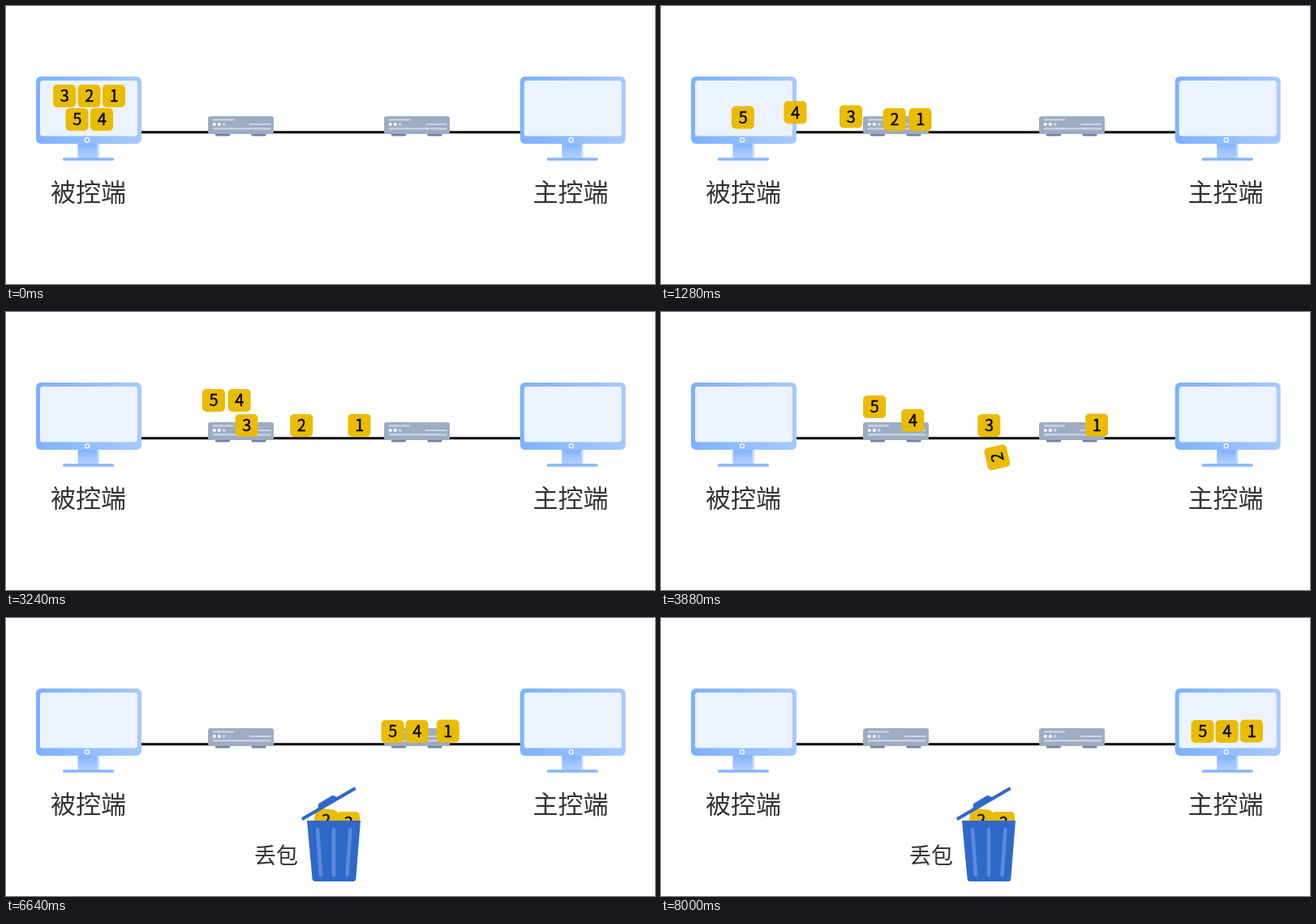
Write an HTML page that moves like this. It is 800 by 343 pixels and loops after 8.6 s.

```html
<!DOCTYPE html>
<html lang="zh-CN">
<head>
<meta charset="utf-8">
<title>丢包</title>
<style>
  html, body { margin: 0; width: 100%; height: 100%; overflow: hidden; background: #fff; }
  svg { display: block; width: 100%; height: 100%; }
  text { font-family: "Noto Sans CJK SC", "Noto Sans CJK JP", "Noto Sans CJK", sans-serif; }
  .label { fill: #333; }
  .digit { font-size: 20px; font-weight: 500; text-anchor: middle; stroke: #000; stroke-width: .4px; }
</style>
</head>
<body>
<svg viewBox="0 0 800 343" xmlns="http://www.w3.org/2000/svg">
  <defs>
    <linearGradient id="frame"><stop offset="0" stop-color="#7db1ff"/><stop offset="1" stop-color="#a6caff"/></linearGradient>
    <linearGradient id="neck" x2="0" y2="1"><stop offset="0" stop-color="#7fb2fe"/><stop offset="1" stop-color="#b4d2ff"/></linearGradient>
    <g id="monitor">
      <rect x="88.5" y="169" width="26" height="19" fill="url(#neck)"/>
      <rect x="112.5" y="169" width="2" height="19" fill="#c3dbff"/>
      <rect x="70" y="187.2" width="63" height="3.6" rx="1.5" fill="#86b6fd"/>
      <rect x="37" y="87" width="130" height="83" rx="6" fill="url(#frame)"/>
      <rect x="42" y="92" width="120" height="68.5" rx="3.5" fill="#ecf3ff"/>
      <circle cx="100" cy="165.2" r="2.6" fill="none" stroke="#fff" stroke-width="1.2"/>
    </g>
    <g id="router">
      <rect x="258" y="154" width="18" height="6.5" rx="1.5" fill="#71829e"/>
      <rect x="302.5" y="154" width="18" height="6.5" rx="1.5" fill="#71829e"/>
      <rect x="249" y="136" width="81" height="22" rx="3" fill="#9dacc3"/>
      <path d="M256 140.3h24M301 146h24.500M256 151.4h69.500" stroke="#cbd5e3" stroke-width="2.2" stroke-linecap="round"/>
      <circle cx="256.8" cy="146" r="2" fill="#fff"/>
      <circle cx="262.8" cy="146" r="2" fill="#fff"/>
      <circle cx="268.8" cy="146" r="1.9" fill="#cbd5e3"/>
    </g>
  </defs>

  <path d="M166 155.8H635" stroke="#000" stroke-width="3"/>
  <use href="#monitor"/>
  <use href="#monitor" x="596.7"/>
  <use href="#router"/>
  <use href="#router" x="217"/>
  <text class="label" x="55" y="240.5" font-size="31">被控端</text>
  <text class="label" x="649.5" y="240.5" font-size="31">主控端</text>

  <g id="tiles"></g>

  <g id="bin">
    <text class="label" x="306" y="303.3" font-size="27">丢包</text>
    <path d="M371 250H437L431.3 322Q431 325 428 325H381Q378 325 377.6 322Z" fill="#2f69c8"/>
    <path d="M384 261L388 317M404 261V317M424.500 261L420.500 317" stroke="#5c8bdc" stroke-width="4.6" stroke-linecap="round"/>
    <path d="M364.8 248.3L430.7 210" stroke="#2f69c8" stroke-width="4.2"/>
    <path d="M384.5 237L385.8 229.2L402.5 219.3L409.5 222Z" fill="#2f69c8" stroke="#2f69c8" stroke-linejoin="round"/>
  </g>
</svg>
<script>
const LOOP = 8600, STEP = 40, BIN_AT = 4000;
const COUNT = 5, ROW = 3, LANE = 140, GAP = 200;

const bin = document.getElementById('bin');
const layer = document.getElementById('tiles');
const mix = (a, b, u) => a + (b - a) * u;

function add(parent, tag, attrs) {
  const el = document.createElementNS('http://www.w3.org/2000/svg', tag);
  for (const key in attrs) el.setAttribute(key, attrs[key]);
  return parent.appendChild(el);
}

function makePacket(i) {
  const el = add(layer, 'g', {});
  add(el, 'rect', { x: -14, y: -14, width: 28, height: 28, rx: 5, fill: '#e9bc00' });
  add(el, 'text', { class: 'digit', x: 0.2, y: 7.3 }).textContent = i + 1;
  layer.prepend(el);

  const late = i >= ROW;            // second row on the screen and in the queue
  const k = late ? i - ROW : i;     // place within its row
  const lost = i === 1 || i === 2;
  const home = late ? { x: 118 - 30.5 * k, y: LANE } : { x: 133 - 30.5 * k, y: 111 };
  const legs = [];
  const go = (start, time, x, y, spin = 0) => legs.push({ start, time, x, y, spin });

  // sender to first router
  go(GAP * i + (late ? 400 : 0), 1000, (late ? 287.6 : 319.5) - 31.7 * k, late ? 109 : LANE);

  // first router to second router, or into the bin
  if (lost) {
    const j = i - 1;
    const drop = 3400 + 600 * j;
    go(2600 + GAP * i, 600 + 400 * j, 392 + 32.5 * j, LANE);
    go(drop, 800, 394 + 28 * j, 249.5 + 3.5 * j, -352 - 8 * j);
  } else if (late) {
    go(3400 + 300 * k, 600 + 100 * k, 316 - 32 * k, LANE);
    go(4000 + 400 * k, 1400, 506.5 - 30 * k, LANE);
  } else {
    go(2600, 1200, 537, LANE - 0.5);
  }

  // second router to receiver
  if (!lost) {
    const last = legs[legs.length - 1];
    go(6600 + GAP * (late ? k + 1 : 0), 1000, last.x + 191, last.y);
  }
  return { el, home, legs };
}

function pose({ home, legs }, t) {
  let { x, y } = home, turn = 0;
  for (const leg of legs) {
    if (t <= leg.start) break;
    const u = Math.min(1, (t - leg.start) / leg.time);
    // a dropped packet accelerates down an arc that swings out to the right
    const swing = leg.spin ? 88 * u * (1 - u) : 0;
    x = mix(x, leg.x, u) + swing;
    y = mix(y, leg.y, leg.spin ? u * u : u);
    turn = leg.spin * Math.pow(u, 2.4);
  }
  return `translate(${x} ${y}) rotate(${turn})`;
}

const packets = Array.from({ length: COUNT }, (_, i) => makePacket(i));

function draw(t) {
  for (const p of packets) p.el.setAttribute('transform', pose(p, t));
  bin.setAttribute('visibility', t >= BIN_AT ? 'visible' : 'hidden');
}

const begin = performance.now();
function tick(now) {
  const t = Math.max(0, now - begin) % LOOP;
  draw(Math.floor((t + 2) / STEP) * STEP % LOOP);
  requestAnimationFrame(tick);
}
draw(0);
requestAnimationFrame(tick);
</script>
</body>
</html>
```
